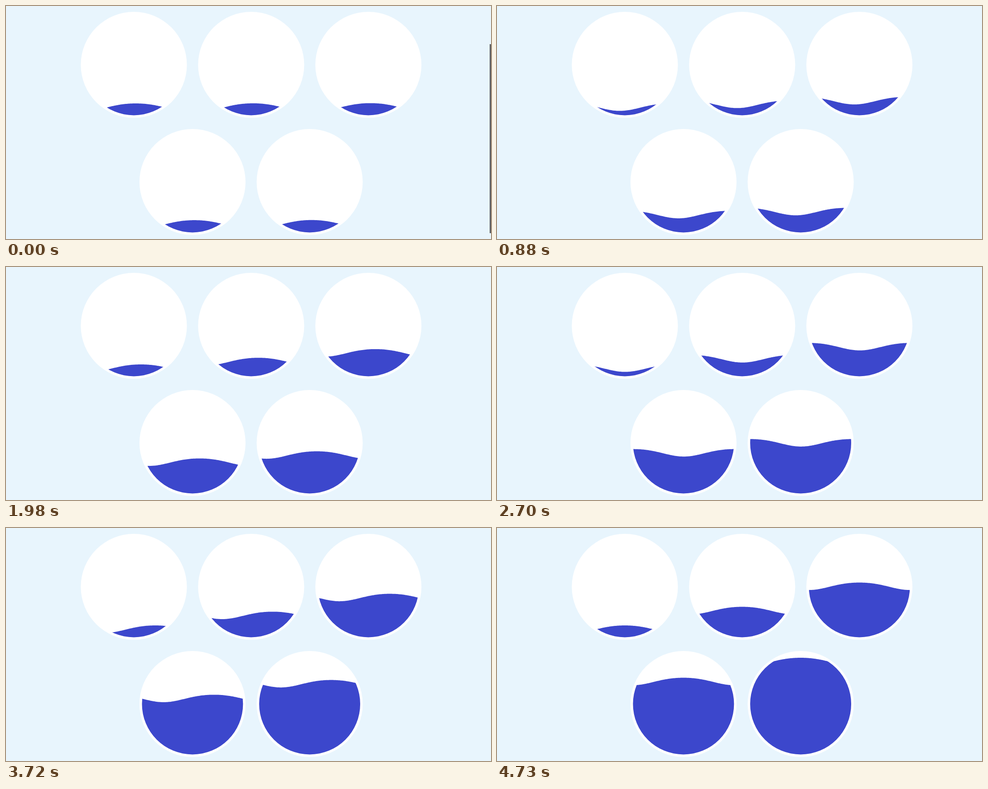
Recreate the animation shown at these times as an HTML page with a canvas. Size 1079x519 px, loop 5.56 s.

```html
<!DOCTYPE html>
<html lang="en">
<head>
<meta charset="utf-8">
<title>Liquid gauges</title>
<style>
  html, body { margin: 0; width: 100%; height: 100%; overflow: hidden; background: #e8f5fd; }
  canvas { display: block; }
</style>
</head>
<body>
<canvas id="stage" width="1079" height="519"></canvas>
<script>
const ctx = document.getElementById('stage').getContext('2d');
const LOOP = 5560, STEP = 78.8, LAST = 60;
const OUTER = 118, INNER = 112.4, WAVE = 224, AMP = 8.3, SKEW = 1.4, START = 94.3;

// centre x, centre y, total rise of the liquid
const gauges = [
  [284.4, 131, 0], [545.4, 131, 41.5], [806.2, 131, 95.5],
  [414.9, 392, 144.5], [675.6, 392, 189]
];

// step, progress
const pace = [[0, .0065], [11, .15], [25, .357], [34, .501], [43, .66], [52, .835], [60, 1]];

function progress(step) {
  const i = Math.max(1, pace.findIndex(([s]) => s >= step));
  const [s0, p0] = pace[i - 1], [s1, p1] = pace[i];
  return p0 + (p1 - p0) * (step - s0) / (s1 - s0);
}

function disc(x, y, r) {
  ctx.beginPath();
  ctx.arc(x, y, r, 0, 2 * Math.PI);
}

function drawGauge([cx, cy, rise], p) {
  disc(cx, cy, OUTER);
  ctx.fillStyle = '#fff';
  ctx.fill();

  const level = cy + START - rise * p;
  const crest = 3 * WAVE * p;
  ctx.beginPath();
  for (let x = -OUTER; x <= OUTER; x += 2) {
    const a = (x - crest) / WAVE * 2 * Math.PI;
    ctx.lineTo(cx + x, level - AMP * Math.cos(a) - SKEW * Math.sin(a) ** 2);
  }
  ctx.lineTo(cx + OUTER, cy + OUTER);
  ctx.lineTo(cx - OUTER, cy + OUTER);
  ctx.save();
  ctx.clip();
  disc(cx, cy, INNER);
  ctx.fillStyle = '#3c47cc';
  ctx.fill();
  ctx.restore();
}

function draw(now) {
  const t = now % LOOP;
  const step = Math.min(LAST, Math.floor(t / STEP + .05));
  const p = progress(step);
  ctx.fillStyle = '#e8f5fd';
  ctx.fillRect(0, 0, 1079, 519);
  gauges.forEach(g => drawGauge(g, p));

  // scrollbar thumb fades out
  ctx.globalAlpha = Math.min(1, Math.max(0, (760 - step * STEP) / 300));
  ctx.fillStyle = '#616265';
  ctx.fillRect(1076, 85, 3, 421);
  ctx.globalAlpha = 1;
}

const begin = performance.now();
function tick() {
  draw(performance.now() - begin);
  requestAnimationFrame(tick);
}
tick();
</script>
</body>
</html>
```
